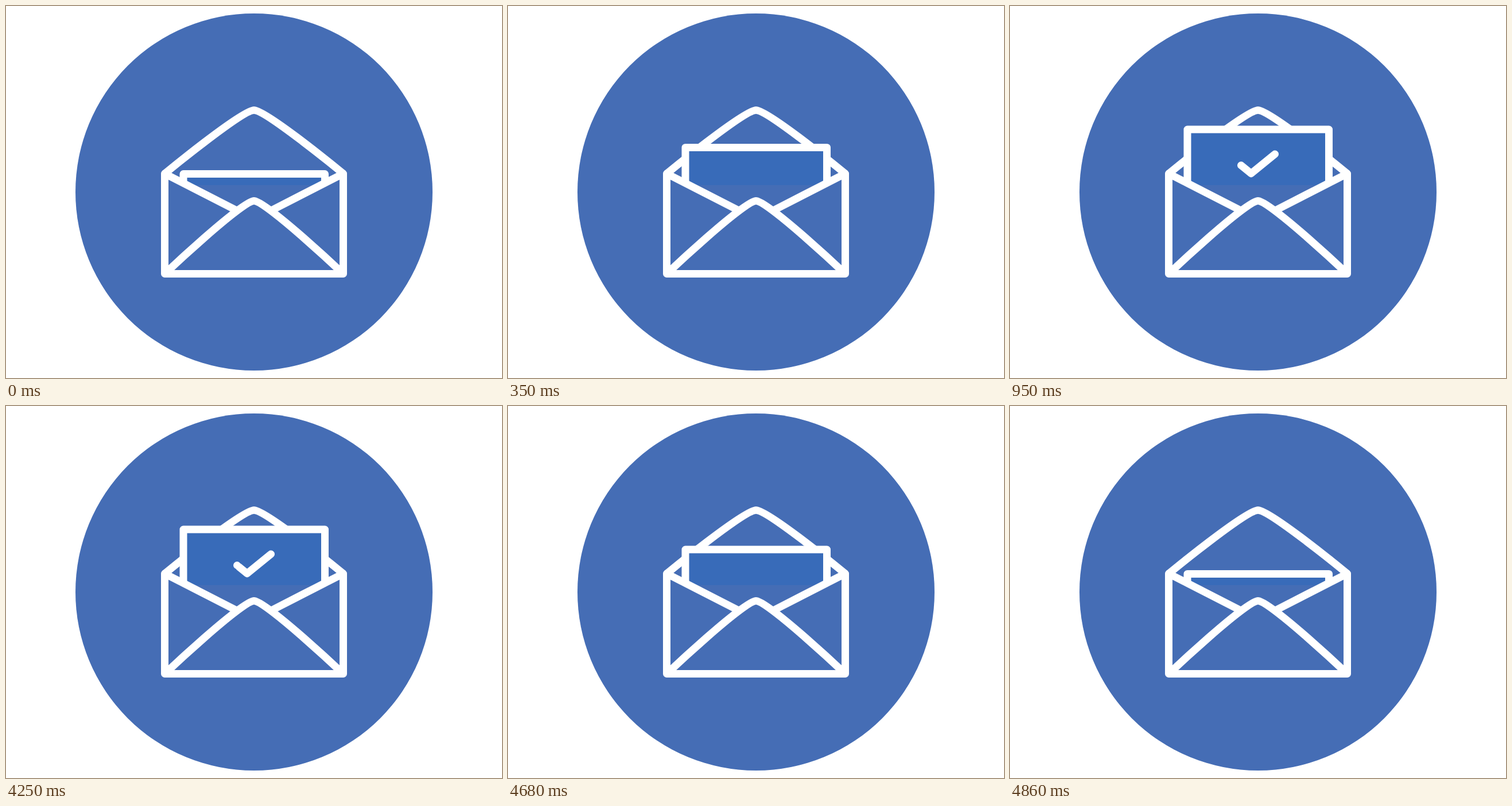
Animation of 864x648 px, one loop 4.89 s. Source, as an HTML page:

```html
<!DOCTYPE html>
<html lang="en">
<head>
<meta charset="utf-8">
<title>Letter received</title>
<style>
  html, body { margin: 0; width: 100%; height: 100%; overflow: hidden; background: #fff; }
  svg { display: block; width: 100vw; height: 100vh; }
  .line { fill: none; stroke: #fff; stroke-width: 13; stroke-linejoin: round; }
</style>
</head>
<body>
<svg viewBox="0 0 864 648">
  <circle cx="432" cy="324" r="311" fill="#456db5"/>
  <path class="line" d="M276.5 292C276.5 292 411 181.5 432 181.5S587.5 292 587.5 292"/>
  <path id="paper" fill="#386bb9"/>
  <path id="edge" class="line"/>
  <path id="check" class="line" stroke-linecap="round" d="M402.5 277.5L420 291.7L461.5 258"/>
  <path class="line" d="M402 356.2L276.5 292V466.5H587.5V292L462 356.2"/>
  <path class="line" d="M276.5 466.5C276.5 466.5 411 339.5 432 339.5S587.5 466.5 587.5 466.5"/>
</svg>
<script>
const LOOP = 4890, STEP = 30, OFFSET = 20;
const LOW = 292.5, HIGH = 215;
const [paper, edge, check] = ['paper', 'edge', 'check'].map(id => document.getElementById(id));
const checkLength = check.getTotalLength();

// Cubic Bézier easing with handles (0.42, 0) and (0.58, 1).
function easeInOut(x) {
  let lo = 0, hi = 1;
  for (let i = 0; i < 24; i++) {
    const s = (lo + hi) / 2, r = 1 - s;
    if (1.26 * s * r * r + 1.74 * s * s * r + s * s * s < x) lo = s;
    else hi = s;
  }
  return lo * lo * (3 - 2 * lo);
}

function progress(time, start, end) {
  const x = (time - start) / (end - start);
  return x <= 0 ? 0 : x >= 1 ? 1 : easeInOut(x);
}

function render(ms) {
  const time = Math.floor((ms % LOOP - OFFSET) / STEP) * STEP + OFFSET;

  const raised = progress(time, 200, 470) - progress(time, 4500, 4860);
  const top = LOW + (HIGH - LOW) * raised;
  paper.setAttribute('d', `M309 ${top}H555.5V312H309Z`);
  edge.setAttribute('d', `M309 308V${top}H555.5V308`);

  const from = progress(time, 4220, 4400) * checkLength;
  const to = progress(time, 770, 950) * checkLength;
  check.style.display = to > from ? '' : 'none';
  check.setAttribute('stroke-dasharray', `0 ${from} ${to - from} ${checkLength * 2}`);
}

let start;
function tick(now) {
  start ??= now;
  render(now - start);
  requestAnimationFrame(tick);
}
render(0);
requestAnimationFrame(tick);
</script>
</body>
</html>
```
